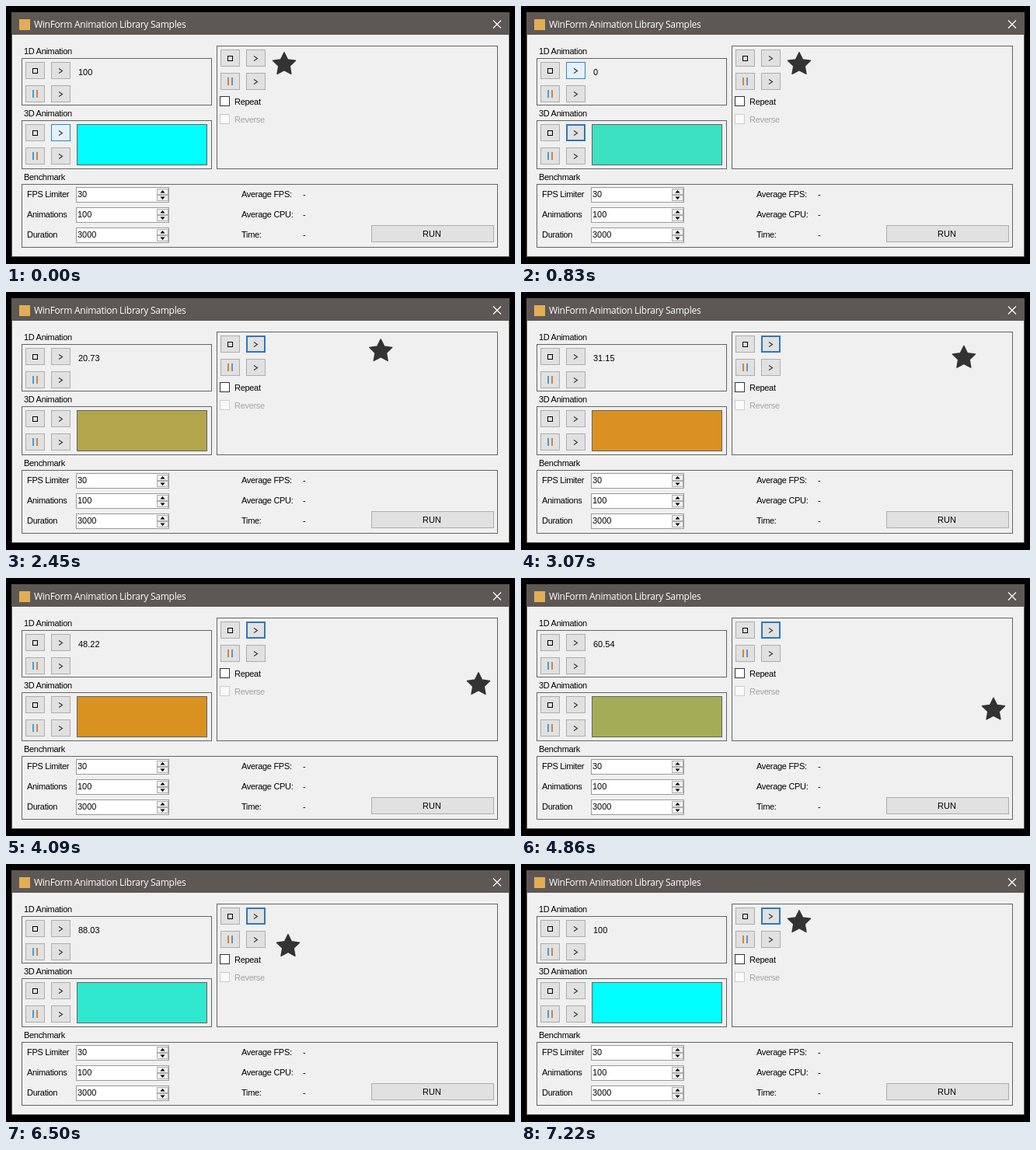
These frames come from a looping animation (655x332 px, 7.28 s). An HTML page:

```html
<!DOCTYPE html>
<html lang="en">
<head>
<meta charset="utf-8">
<title>WinForm Animation Library Samples</title>
<style>
  html, body { margin: 0; width: 100%; height: 100%; overflow: hidden; background: #000; }
  svg { display: block; width: 655px; height: 332px; }
  text { font: 11px "Liberation Sans", Arial, sans-serif; fill: #000; white-space: pre; }
  .label { letter-spacing: -.3px; }
  .title { font: 12px "Open Sans", "Noto Sans", sans-serif; letter-spacing: -.27px; fill: #fff; }
  rect { shape-rendering: crispEdges; }
</style>
</head>
<body>
<svg id="stage" viewBox="0 0 655 332" xmlns="http://www.w3.org/2000/svg"></svg>
<script>
const LOOP = 7280;
const stage = document.getElementById('stage');

function setAttrs(node, attrs) {
  for (const key in attrs) node.setAttribute(key, attrs[key]);
  return node;
}

function add(tag, attrs, content) {
  const node = setAttrs(document.createElementNS(stage.namespaceURI, tag), attrs);
  if (content !== undefined) node.textContent = content;
  return stage.appendChild(node);
}

// Attributes of a rectangle whose border lies inside its edges.
const inset = (x, y, w, h, border = 1) => ({
  x: x + border / 2, y: y + border / 2, width: w - border, height: h - border, 'stroke-width': border
});

const fillRect = (x, y, width, height, fill) => add('rect', { x, y, width, height, fill });
const box = (x, y, w, h, fill, stroke) => add('rect', { ...inset(x, y, w, h), fill, stroke });
const line = (d, stroke, width) => add('path', { d, stroke, 'stroke-width': width, fill: 'none' });
const text = (x, y, content, cls = '', attrs = {}) => add('text', { x, y, class: cls, ...attrs }, content);
const label = (x, y, content, attrs) => text(x, y, content, 'label', attrs);
const button = (x, y, w = 25, h = 22) => box(x, y, w, h, '#e1e1e1', '#adadad');
const chevron = (x, y) => line(`M${x + 10} ${y + 8.5}l4.5 3l-4.5 3`, '#333', 1.1);

// Stop, play, pause and resume buttons; returns a function that styles the play button.
function controls(x, y, left, right) {
  button(x, y);
  box(x + 9, y + 8, 7, 7, 'none', '#000');
  const play = button(x + 33, y);
  chevron(x + 33, y);
  button(x, y + 30);
  fillRect(x + 9, y + 36, 2, 10, left);
  fillRect(x + 14, y + 36, 2, 10, right);
  button(x + 33, y + 30);
  chevron(x + 33, y + 30);
  return ({ fill, stroke, border }) =>
    setAttrs(play, { ...inset(x + 33, y, 25, 22, border), fill, stroke });
}

function spinner(y, name, value) {
  label(27, y + 13, name);
  box(90, y, 120, 20, '#fff', '#9a9a9a');
  text(92, y + 13, value);
  for (const top of [y + 2, y + 10]) box(194, top, 15, 8, '#f0f0f0', '#adadad');
  add('path', { d: `M198.5 ${y + 7.5}h6l-3 -3.5zM198.5 ${y + 12.5}h6l-3 3.5z` });
}

function starPath(outer, inner) {
  const point = i => {
    const r = i % 2 ? inner : outer, a = i * Math.PI / 5;
    return (r * Math.sin(a)).toFixed(2) + ' ' + (-r * Math.cos(a)).toFixed(2);
  };
  return 'M' + Array.from({ length: 10 }, (_, i) => point(i)).join('L') + 'z';
}

// Window frame
fillRect(7, 8, 641, 315, '#5d5855');
fillRect(8, 37, 639, 285, '#f0f0f0');
fillRect(17, 17, 14, 14, '#e3ad55');
text(36, 28, 'WinForm Animation Library Samples', 'title');
line('M627 18.5l10 10M637 18.5l-10 10', '#fff', 1.2);

// Group panels
const GROUP = '#646464';
box(20, 67, 245, 61, 'none', GROUP);
box(20, 147, 245, 63, 'none', GROUP);
box(271, 51, 362, 159, 'none', GROUP);
box(20, 229, 613, 82, 'none', GROUP);
label(23, 62, '1D Animation');
label(23, 142, '3D Animation');
label(23, 224, 'Benchmark');

const BLUE = '#45a0d0', ORANGE = '#d0804a';
const stylePlay1 = controls(25, 72, BLUE, ORANGE);
const stylePlay3 = controls(25, 152, BLUE, ORANGE);
const stylePlay2 = controls(276, 56, '#c98a3c', '#6a8fb8');
const counter = text(93, 89, '', '', { fill: '#222' });
const swatch = box(91, 152, 168, 53, '#0ff', GROUP);

box(275, 116, 13, 13, '#fff', '#333');
label(294, 127, 'Repeat');
box(275, 139, 13, 13, '#fafafa', '#ccc');
label(294, 150, 'Reverse', { style: 'fill:#a3a3a3' });

spinner(233, 'FPS Limiter', '30');
spinner(259, 'Animations', '100');
spinner(285, 'Duration', '3000');
['Average FPS:', 'Average CPU:', 'Time:'].forEach((name, i) => {
  label(303, 246 + 26 * i, name);
  text(382, 246 + 26 * i, '-');
});
button(470, 282, 158, 22);
text(548, 297, 'RUN', '', { 'text-anchor': 'middle' });

const star = add('path', {
  d: starPath(15.3, 7.6), fill: '#333', stroke: '#333', 'stroke-width': 1.4, 'stroke-linejoin': 'round'
});

const LOOKS = {
  idle: { fill: '#e1e1e1', stroke: '#adadad', border: 1 },
  hover: { fill: '#e5f1fb', stroke: '#2f86c0', border: 1 },
  focus: { fill: '#e1e1e1', stroke: '#2f78b8', border: 2 }
};

// Motion: share of the span from start to end that has passed, then easing.
const progress = (t, start, end) => Math.min(1, Math.max(0, (t - start) / (end - start)));
const mix = (a, b, p) => a + (b - a) * p;
const quadOut = p => 1 - (1 - p) ** 2;
const cubicIn = p => p ** 3;
const cubicInOut = p => p < .5 ? 4 * p ** 3 : 1 - 4 * (1 - p) ** 3;

// The picture repaints at a steady rate once the counter is under way.
const REPAINT = 1030, STEP = 56.8;
const snap = t => t < REPAINT ? t : REPAINT + Math.floor((t - REPAINT) / STEP + .25) * STEP;

const starX = t => mix(358, 608, quadOut(progress(t, 1880, 3840)) - cubicInOut(progress(t, 5277, 6731)));
const starY = t => mix(75, 169.5, cubicIn(progress(t, 1880, 4430)) - progress(t, 5170, 7120));
const count = t => +(100 * progress(t, 1208, 7200)).toFixed(2);

// The swatch fades to orange and back, first repainted after a pause.
function swatchColor(t) {
  const p = t < 370 ? 0 : progress(t, 15, 3000) - progress(t, 4090, 7150);
  return `rgb(${Math.round(mix(0, 218, p))},${Math.round(mix(255, 145, p))},${Math.round(mix(255, 33, p))})`;
}

function render(time) {
  const t = snap(time);
  stylePlay3(LOOKS[t < 830 ? 'hover' : t < 1200 ? 'focus' : 'idle']);
  stylePlay1(LOOKS[t < 830 ? 'idle' : t < 1400 ? 'hover' : t < 1880 ? 'focus' : 'idle']);
  stylePlay2(LOOKS[t < 1500 ? 'idle' : t < 1880 ? 'hover' : 'focus']);
  counter.textContent = t < 830 ? 100 : count(t);
  swatch.setAttribute('fill', swatchColor(t));
  star.setAttribute('transform', `translate(${starX(t).toFixed(2)} ${starY(t).toFixed(2)})`);
}

const began = performance.now();
function frame() {
  render((performance.now() - began) % LOOP);
  requestAnimationFrame(frame);
}
frame();
</script>
</body>
</html>
```
